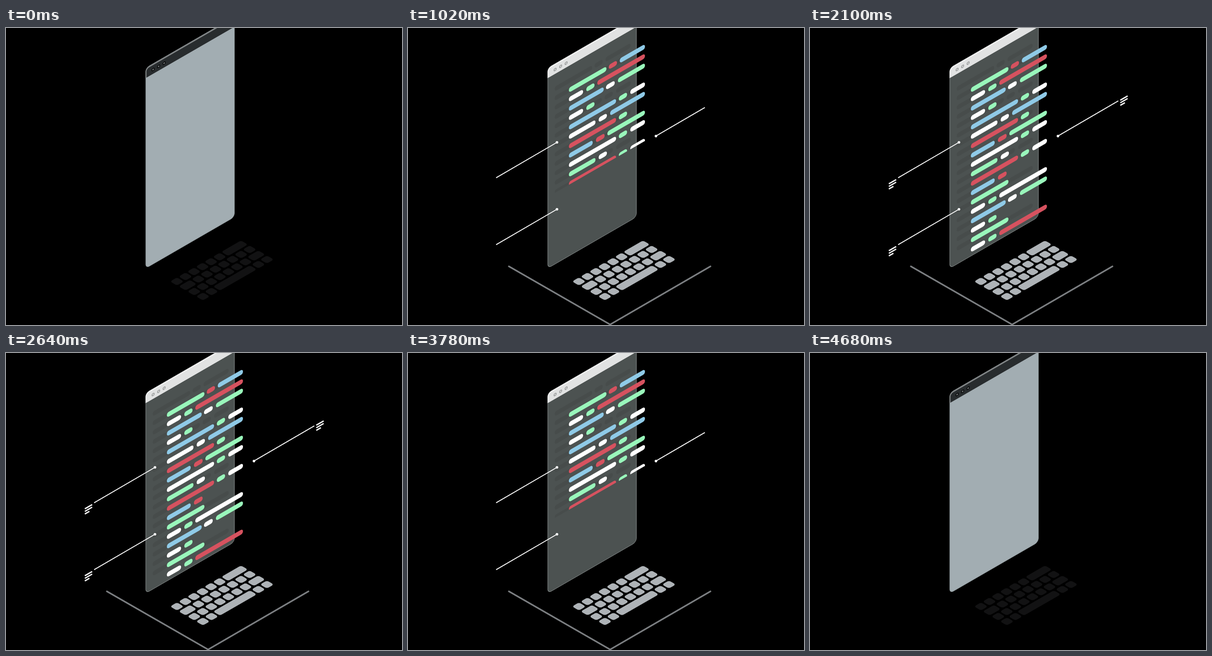
Write an HTML page with a canvas that moves like this. It is 864 px wide and 648 px high and loops after 4800 ms.

```html
<!DOCTYPE html>
<html lang="en">
<head>
<meta charset="utf-8">
<title>Isometric code window</title>
<style>
  html, body { margin: 0; width: 100%; height: 100%; overflow: hidden; background: #000; }
  canvas { display: block; width: 864px; height: 648px; }
</style>
</head>
<body>
<canvas id="stage" width="864" height="648"></canvas>
<script>
const ctx = document.getElementById('stage').getContext('2d');
const LOOP = 4800, STEP = 60, SLOPE = 0.577;

// Tracks: [time, value] pairs, linear in between
const FADE = [[120, 0], [540, 0.67], [900, 1]];
const REVEAL = [[330, 150], [540, 234], [1020, 368.7], [1680, 478], [2160, 524]];
const LEFT_LINE = [[485, 0], [540, 13], [1020, 132]];
const RIGHT_LINE = [[450, 0], [540, 17], [1020, 106], [1155, 131]];
const NOTES = [[1060, 0], [1500, 1]];

const COLORS = { g: '#99f6bb', r: '#d6525f', b: '#8fcae7', w: '#ffffff' };

// Bars per row: colour, start and end
const A = 'g351-433', B = 'w351-382 g389-407', C = 'b351-427 w432-451 g458-517';
const D = '351-454 g460-478', E = 'b351-403 r410-429', W = ' w485-517';
const ROWS = [
  A + ' r438-456 b462-517', B + ' r413-517', C, B,
  'b' + D + W, 'w351-409 w416-434 b441-517', 'r' + D, E + ' g435-517',
  'w' + D + W, 'g351-409 w416-434', 'r' + D + W, E,
  A, B + ' w413-517', C, B, A, B + ' r413-517'
].map(row => row.split(' ').map(bar => {
  const [x1, x2] = bar.slice(1).split('-').map(Number);
  return { color: COLORS[bar[0]], x: x1 - 305, w: x2 - x1 };
}));

// Keys per row: [centre, width] in key units
const run = (from, n) => Array.from({ length: n }, (_, i) => [from + i, 1]);
const KEYS = [
  [...run(0, 6), [6.75, 2.5]],
  [[0.25, 1.5], ...run(1.5, 7)],
  [...run(0, 7), [7.25, 1.5]],
  [...run(0, 2), [3.75, 4.5], ...run(6.5, 2)]
];

function track(points, t) {
  if (t <= points[0][0]) return points[0][1];
  for (let i = 1; i < points.length; i++) {
    const [t0, v0] = points[i - 1], [t1, v1] = points[i];
    if (t < t1) return v0 + (v1 - v0) * (t - t0) / (t1 - t0);
  }
  return points[points.length - 1][1];
}

function mix(a, b, p) {
  return `rgb(${a.map((v, i) => Math.round(v + (b[i] - v) * p))})`;
}

function box(x, y, w, h, r, color) {
  ctx.beginPath();
  ctx.roundRect(x, y, w, h, r);
  ctx.fillStyle = color;
  ctx.fill();
}

function line(points, width, color, cap = 'round') {
  ctx.beginPath();
  points.forEach(([x, y]) => ctx.lineTo(x, y));
  ctx.lineWidth = width;
  ctx.lineCap = cap;
  ctx.lineJoin = 'round';
  ctx.strokeStyle = color;
  ctx.stroke();
}

function layer(draw) {
  ctx.save();
  draw();
  ctx.restore();
}

function drawFloor(p) {
  layer(() => {
    ctx.globalAlpha = p;
    line([[220, 520], [441, 647], [660, 520]], 3.3, '#7c7f82');
  });
}

function drawKeyboard(p) {
  layer(() => {
    ctx.globalAlpha = 0.1 + 0.9 * p;
    ctx.transform(0.866, -0.5, 0.866, 0.5, 373, 553);
    KEYS.forEach((row, j) => row.forEach(([c, n]) => {
      const w = n * 21.5 - 4;
      box(c * 21.5 - w / 2, j * 21.8 - 8.75, w, 17.5, 5.2, '#aeb3b7');
    }));
  });
}

function drawWindow(p) {
  const head = Math.min(1, p * 1.4);
  box(0, 87, 193.3, 437, 8, mix([162, 173, 178], [76, 82, 81], p));
  ctx.lineWidth = 1;
  ctx.strokeStyle = mix([150, 160, 164], [140, 146, 146], p);
  ctx.stroke();

  layer(() => {
    ctx.beginPath();
    ctx.rect(-2, 80, 198, 29);
    ctx.clip();
    box(-0.5, 87, 193.5, 60, 8, mix([128, 132, 133], [241, 241, 241], head));
    box(1.5, 90, 191.5, 60, 6, mix([40, 44, 46], [225, 226, 226], head));
  });
  for (const x of [16, 28, 40]) {
    ctx.beginPath();
    ctx.arc(x, 99.8, 2.5, 0, 7);
    ctx.fillStyle = mix([120, 125, 126], [214, 215, 215], head);
    ctx.fill();
    ctx.lineWidth = 1.5;
    ctx.strokeStyle = mix([0, 0, 0], [152, 154, 154], p);
    ctx.stroke();
  }
}

function drawCode(p, limit) {
  const bars = (dx, dy, color) => ROWS.forEach((row, i) => row.forEach(b =>
    box(b.x + dx, 157.3 + i * 20.5 + dy, b.w, 10.4, 5, color || b.color)));
  layer(() => {
    ctx.beginPath();
    ctx.rect(0, 110, 240, limit - 110);
    ctx.clip();
    layer(() => {
      ctx.beginPath();
      ctx.rect(0, 109, 193, 415);
      ctx.clip();
      bars(-31, -20.5, `rgba(0,0,0,${0.07 * p})`);
    });
    ctx.globalAlpha = 0.5 + 0.5 * p;
    bars(0, 0);
  });
}

function drawPointer(x, y, dir, len) {
  if (len <= 0) return;
  line([[x, y], [x + dir * len, y - dir * len * 0.583]], 2, '#fff');
  ctx.beginPath();
  ctx.arc(x, y, 2.8, 0, 7);
  ctx.fillStyle = '#fff';
  ctx.fill();
}

function drawNote(x, y, p) {
  [16, 16, 10].forEach((w, i) => {
    const len = w * Math.max(0, Math.min(1, p * 3 - i));
    const top = y + i * 5.6;
    if (len) line([[x, top], [x + len, top - len * SLOPE]], 2.8, '#fff', 'butt');
  });
}

function draw(time) {
  const t = Math.floor(time % LOOP / STEP) * STEP;
  // The opening holds, then the build runs out and back
  const m = t < 540 ? 0 : Math.min(t, LOOP - t);
  const p = track(FADE, m);

  ctx.fillStyle = '#000';
  ctx.fillRect(0, 0, 864, 648);
  drawFloor(p);
  drawKeyboard(p);
  layer(() => {
    ctx.transform(1, -SLOPE, 0, 1, 305, 0);
    drawWindow(p);
    drawCode(p, track(REVEAL, m));
  });

  const left = track(LEFT_LINE, m), notes = track(NOTES, m);
  drawPointer(325, 249.5, -1, left);
  drawPointer(325, 395.5, -1, left);
  drawPointer(541, 235.7, 1, track(RIGHT_LINE, m));
  drawNote(172, 340, notes);
  drawNote(172, 486, notes);
  drawNote(677, 157.5, notes);
}

const start = performance.now();
function tick() {
  draw(performance.now() - start);
  requestAnimationFrame(tick);
}
tick();
</script>
</body>
</html>
```
